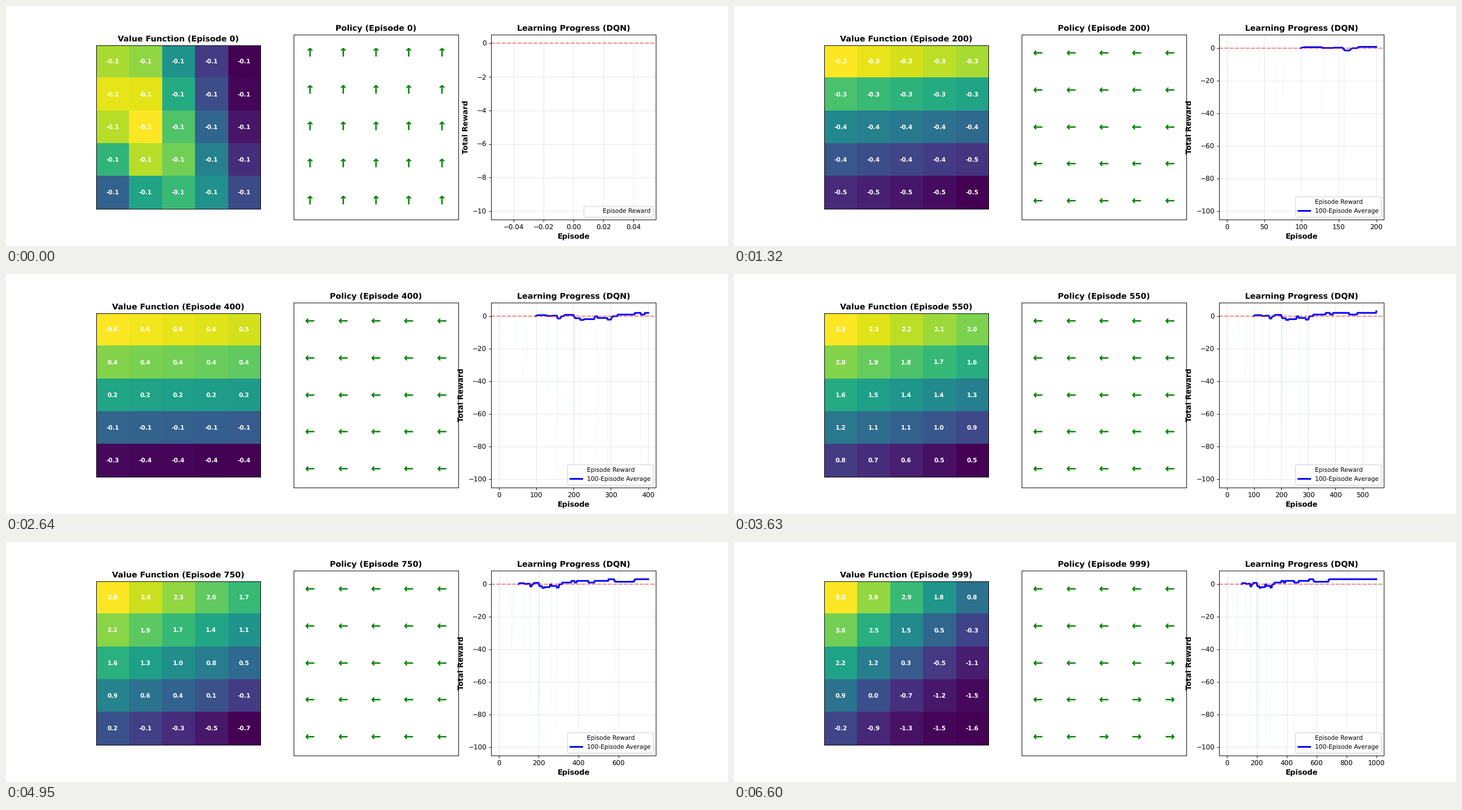
A matplotlib script that plays this animation: 1280x427 px, repeating every 6.93 s.

```python
import numpy as np
import matplotlib.pyplot as plt
from matplotlib.animation import FuncAnimation

DPI = 256 / 3
WINDOW = 100
EPISODES = [*range(0, 1000, 50), 999]

plt.rcParams["text.hinting"] = "none"
row, col = np.mgrid[:5, :5]


def make_rewards():
    """Solved episodes earn 3; crashes and slips earn less."""
    r = np.full(1000, 3.0)
    r[:5] = -10, -22, -6, 1, -7
    r[65:69] = np.linspace(-43, -22, 4)
    r[75:78] = np.linspace(-32, -16, 3)
    r[[156, 201, 218, 264, 291, 380, 450, 579]] = -100
    r[[43, 128, 158, 203, 205, 584]] = -17, -47, -69, -70, -29, -52
    return r


def untrained():
    """Ridge that drifts to the right in the lower rows."""
    ridge = np.exp(-(col - 0.4 - 0.09 * row**2)**2 / 5)
    return -0.105 + 0.02 * ridge * (1 - 0.05 * (row - 1.5)**2)


def slope(top, down, across, twist, bend):
    return (top + down * row + across * col + twist * row * col
            + bend * row * (4 - row) / 4)


def trained():
    """Slope away from the goal corner that levels out at a soft floor."""
    return -1.7 + 1.2 * np.logaddexp(0, (6.71 - 1.42 * row - 1.08 * col) / 1.2)


REWARDS = make_rewards()
VALUES = {
    0: untrained(),
    100: slope(-0.0427, -0.0218, 0.0002, 0.0007, 0),
    300: slope(-0.451, -0.0872, -0.0165, -0.00025, -0.045),
    400: slope(0.605, -0.2378, -0.01625, 0.0026, 0.075),
    550: slope(2.345, -0.3888, -0.0925, 0.0028, 0.054),
    750: slope(2.85, -0.6725, -0.2925, 0.0169, 0.05),
    999: trained(),
}


def values_at(ep):
    a = max(k for k in VALUES if k <= ep)
    b = min(k for k in VALUES if k >= ep)
    f = (ep - a) / max(b - a, 1)
    return (1 - f) * VALUES[a] + f * VALUES[b]


def arrow_at(ep, r, c):
    if ep == 0:
        return "↑"
    # Right turns spread from the far corner late in training.
    return "→" if r + c > (1290 - ep) / 50 else "←"


def label_cells(ax, text, **style):
    for r, c in np.ndindex(5, 5):
        ax.text(c, r, text(r, c), ha="center", va="center",
                fontweight="bold", **style)


def panel(ax, title):
    ax.set_title(title, fontsize=12, fontweight="bold")
    ax.set_xticks([])
    ax.set_yticks([])


def draw_values(ax, ep):
    v = values_at(ep)
    ax.imshow(v, cmap="viridis")
    label_cells(ax, lambda r, c: f"{v[r, c]:.1f}", color="white", fontsize=9)
    panel(ax, f"Value Function (Episode {ep})")


def draw_policy(ax, ep):
    ax.set_xlim(-0.5, 4.5)
    ax.set_ylim(4.5, -0.5)
    label_cells(ax, lambda r, c: arrow_at(ep, r, c), color="green", fontsize=18)
    panel(ax, f"Policy (Episode {ep})")


def draw_progress(ax, ep):
    seen = REWARDS[:ep + 1]
    ax.plot(seen, color="lightblue", alpha=0.2, lw=0.5, label="Episode Reward")
    if len(seen) >= WINDOW:
        mean = np.convolve(seen, np.ones(WINDOW) / WINDOW, mode="valid")
        ax.plot(range(WINDOW - 1, len(seen)), mean, color="blue", lw=2.5,
                label="100-Episode Average")
    ax.axhline(0, color="red", ls="--", lw=1.5, alpha=0.5)
    ax.set_xlabel("Episode", fontsize=11, fontweight="bold")
    ax.set_ylabel("Total Reward", fontsize=11, fontweight="bold")
    ax.set_title("Learning Progress (DQN)", fontsize=12, fontweight="bold")
    ax.legend(loc="lower right", fontsize=9, labelspacing=0.58)
    ax.grid(True, alpha=0.3)


fig, axes = plt.subplots(1, 3, figsize=(1280 / DPI, 427 / DPI), dpi=DPI)
fig.subplots_adjust(left=0.1247, wspace=0.202)


def update(i):
    for ax, draw in zip(axes, (draw_values, draw_policy, draw_progress)):
        ax.clear()
        draw(ax, EPISODES[i])
    return []


anim = FuncAnimation(fig, update, frames=len(EPISODES), interval=330,
                     init_func=lambda: [], repeat=True, repeat_delay=0)
plt.show()
```
